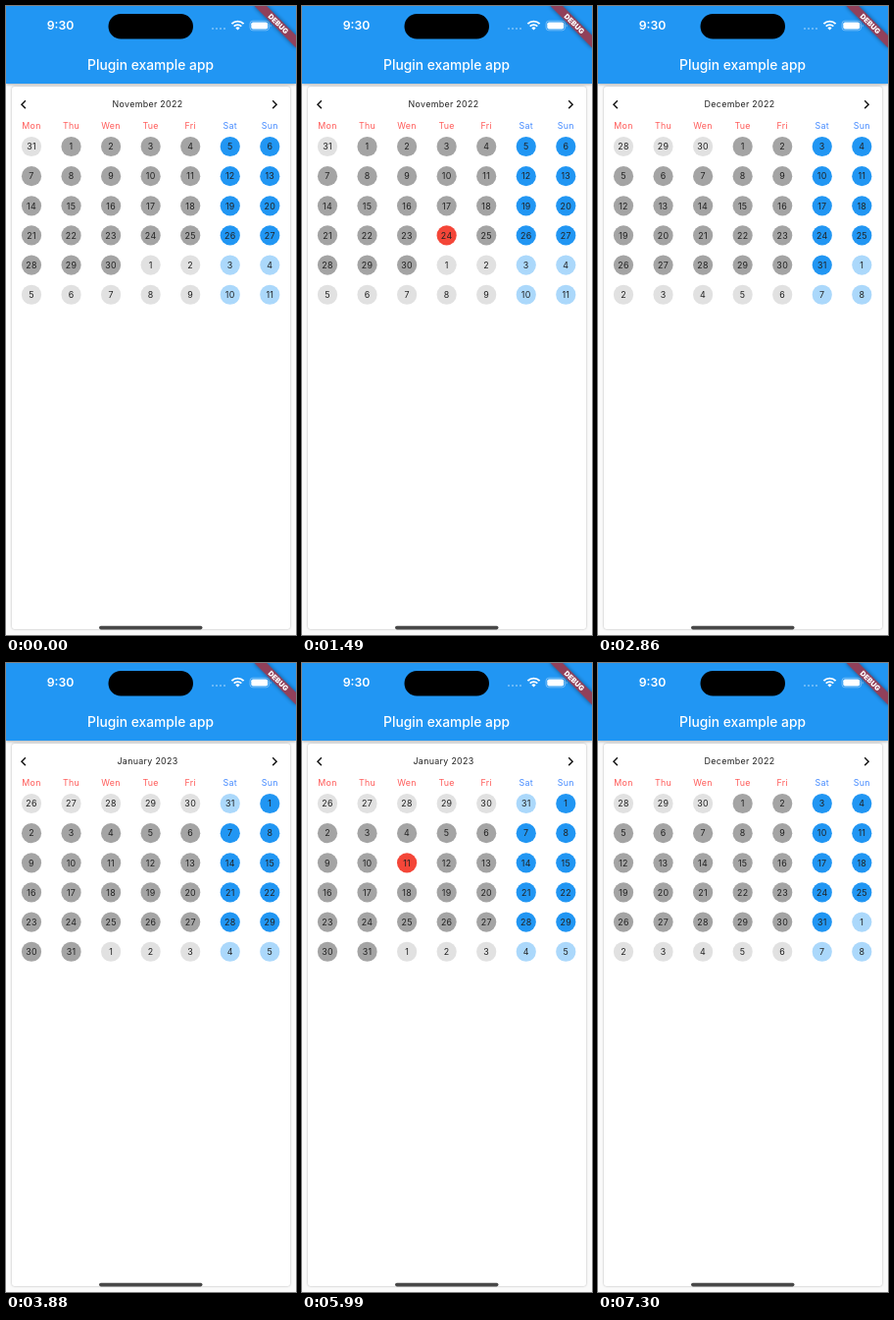
An HTML page that plays this animation: 296x640 px, repeating every 8000 ms.

```html
<!DOCTYPE html>
<html lang="en">
<head>
<meta charset="utf-8">
<title>Calendar</title>
<style>
  html, body { margin: 0; width: 100%; height: 100%; overflow: hidden; background: #fafafa; }
  svg { display: block; width: 100%; height: 100%; }
  text { font-family: Inter, Roboto, sans-serif; text-anchor: middle; }
  .calendar text { font-size: 8.9px; letter-spacing: .3px; fill: #222; }
  .calendar .workday { fill: #ff5a58; }
  .calendar .weekend { fill: #448aff; }
  .chevron { fill: none; stroke: #1a1a1a; stroke-width: 1.5; }
  .bar { filter: drop-shadow(0 1.5px 1.5px rgba(0, 0, 0, .3)); }
  .card { filter: drop-shadow(0 .8px .8px rgba(0, 0, 0, .28)); }
  .banner { filter: drop-shadow(0 0 2px rgba(0, 0, 0, .45)); }
</style>
</head>
<body>
<svg viewBox="0 0 296 640" preserveAspectRatio="none">
  <rect width="296" height="640" fill="#fafafa"/>
  <rect class="card" x="6" y="82" width="284" height="552" rx="3" fill="#fff"/>
  <rect class="bar" width="296" height="79" fill="#2196f3"/>

  <g fill="#fff">
    <text x="55.5" y="24.4" font-size="12.3" font-weight="600">9:30</text>
    <text x="147.5" y="64.8" font-size="13.8" font-weight="500">Plugin example app</text>
    <g opacity=".4">
      <circle cx="211" cy="23" r="1.1"/><circle cx="215" cy="23" r="1.1"/>
      <circle cx="219" cy="23" r="1.1"/><circle cx="223" cy="23" r="1.1"/>
    </g>
    <g fill="none" stroke="#fff" stroke-width="1.9">
      <path d="M230.4 18.2a8.6 8.6 0 0 1 12.2 0"/>
      <path d="M232.7 20.7a5.4 5.4 0 0 1 7.6 0"/>
    </g>
    <path d="M234.4 22.4a3 3 0 0 1 4.2 0l-2.1 2.2z"/>
    <rect x="249" y="15.2" width="19.5" height="9.6" rx="2.9" fill="none" stroke="#fff" stroke-opacity=".45" stroke-width=".8"/>
    <rect x="250.3" y="16.5" width="16.9" height="7" rx="1.8"/>
    <path d="M269.7 18.4a1.8 1.8 0 0 1 0 3.2z" opacity=".5"/>
  </g>
  <rect x="104.5" y="8" width="86.5" height="25.5" rx="12.75"/>

  <g transform="translate(296 0) rotate(45)">
    <rect class="banner" x="-30.1" y="21.1" width="60.2" height="9" fill="#91405a"/>
    <text y="28.2" font-size="7.3" font-weight="900" fill="#fff">DEBUG</text>
  </g>

  <g class="calendar">
    <path class="chevron" d="M19.9 96.3l-3.9 3.9 3.9 3.9M272.2 96.3l3.9 3.9-3.9 3.9"/>
    <text id="month" x="144.5" y="103.3"></text>
    <g id="weekdays"></g>
    <g id="days"></g>
  </g>
  <rect x="95" y="630.8" width="105.5" height="3.6" rx="1.8" fill="#484848"/>
</svg>
<script>
const LOOP = 8000;
const DAY = 864e5;
const STEPS = [
  { at: 0, year: 2022, month: 10 },
  { at: 1490, year: 2022, month: 10, selected: 24 },
  { at: 2860, year: 2022, month: 11 },
  { at: 3880, year: 2023, month: 0 },
  { at: 5990, year: 2023, month: 0, selected: 11 },
  { at: 7300, year: 2022, month: 11 },
];
const MONTHS = { 0: "January", 10: "November", 11: "December" };
const WEEKDAYS = ["Mon", "Thu", "Wen", "Tue", "Fri", "Sat", "Sun"];

const byId = id => document.getElementById(id);
const columnX = column => 26 + column * 40.55;
const rowY = row => 143 + row * 30.15;

function add(parent, tag, attributes) {
  const node = document.createElementNS("http://www.w3.org/2000/svg", tag);
  for (const [name, value] of Object.entries(attributes)) node.setAttribute(name, value);
  return parent.appendChild(node);
}

WEEKDAYS.forEach((name, column) => {
  const kind = column < 5 ? "workday" : "weekend";
  add(byId("weekdays"), "text", { x: columnX(column), y: 124.8, class: kind }).textContent = name;
});

const cells = Array.from({ length: 42 }, (_, i) => {
  const x = columnX(i % 7), y = rowY(Math.floor(i / 7));
  return {
    circle: add(byId("days"), "circle", { cx: x, cy: y, r: 10.1 }),
    label: add(byId("days"), "text", { x, y: y + 3.2 }),
  };
});

function dayColor(inMonth, isWeekend, isSelected) {
  if (isSelected) return "#f44638";
  if (isWeekend) return inMonth ? "#2196f3" : "#abd8fb";
  return inMonth ? "#a4a4a4" : "#e1e1e1";
}

function render({ year, month, selected }) {
  byId("month").textContent = `${MONTHS[month]} ${year}`;
  const first = new Date(Date.UTC(year, month, 1));
  const monday = first - (first.getUTCDay() + 6) % 7 * DAY;
  cells.forEach(({ circle, label }, i) => {
    const date = new Date(monday + i * DAY);
    const day = date.getUTCDate();
    const inMonth = date.getUTCMonth() === month;
    circle.setAttribute("fill", dayColor(inMonth, i % 7 > 4, inMonth && day === selected));
    label.textContent = day;
  });
}

const start = performance.now();
let shown;
function tick() {
  const time = (performance.now() - start) % LOOP;
  const step = STEPS.findLast(({ at }) => at <= time);
  if (step !== shown) render(shown = step);
  requestAnimationFrame(tick);
}
tick();
</script>
</body>
</html>
```
